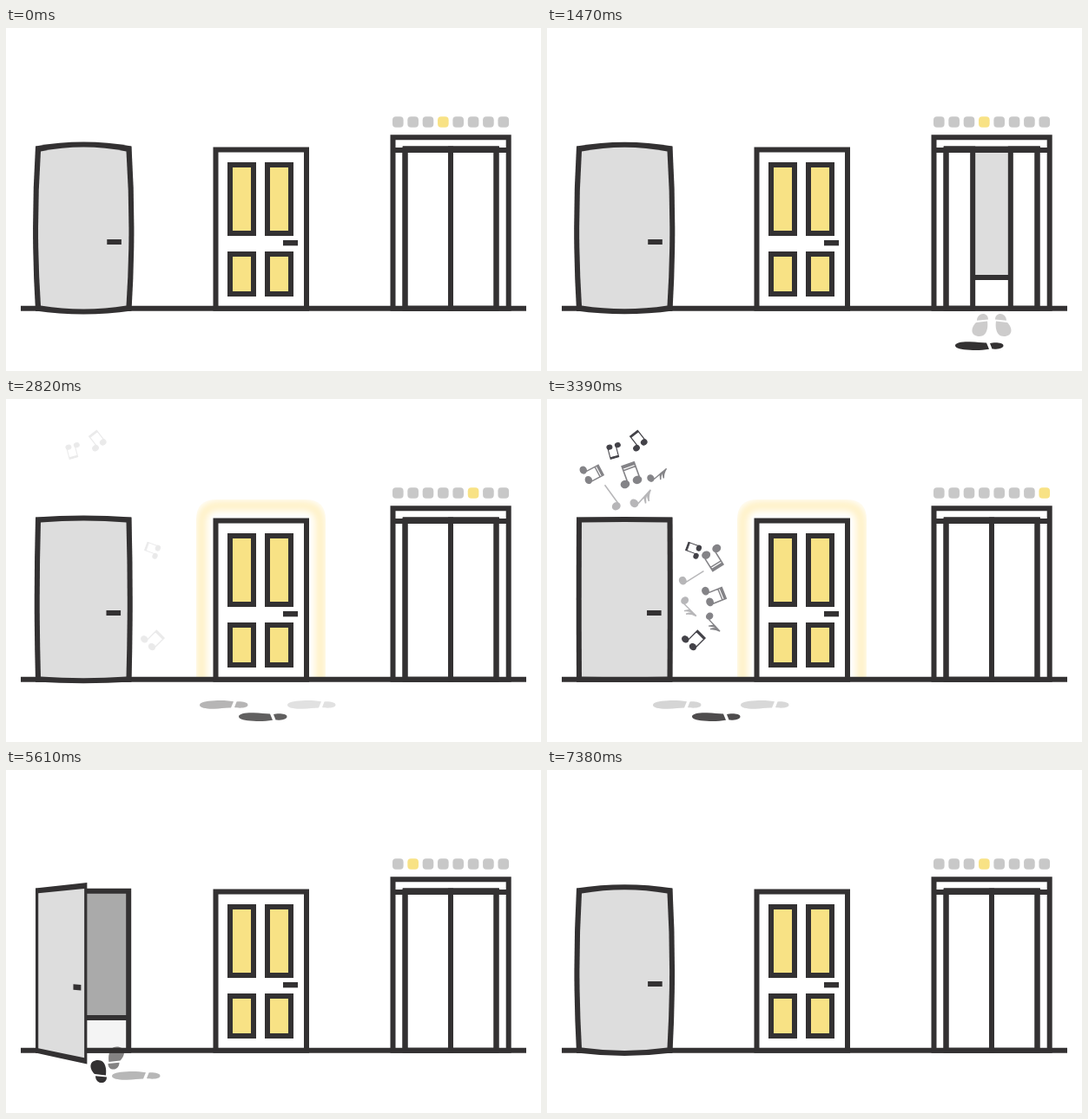
Recreate the animation shown at these times as an HTML page. Size 616x396 px, loop 7410 ms.

```html
<!DOCTYPE html>
<html lang="en">
<head>
<meta charset="utf-8">
<title>Three doors</title>
<style>
html, body { margin: 0; width: 100%; height: 100%; overflow: hidden; background: #fff; }
svg { display: block; width: 616px; height: 396px; }
.line { fill: none; stroke: #333132; stroke-width: 6; }
.ink { fill: #333132; }
.grey { fill: #ddd; }
.white { fill: #fff; }
.panel { fill: #f8e285; stroke: #333132; stroke-width: 6; }
.note { fill: #3b3a40; stroke: #3b3a40; stroke-width: 1.4; }
</style>
</head>
<body>
<svg id="stage" viewBox="0 0 616 396">
  <defs>
    <filter id="soft" x="-20%" y="-20%" width="140%" height="140%"><feGaussianBlur stdDeviation="4"/></filter>
    <clipPath id="halo"><path d="M219 321V139Q219 116 242 116H345Q368 116 368 139V321Z"/></clipPath>
  </defs>
  <g id="glow" clip-path="url(#halo)">
    <path d="M225 335V143Q225 123 245 123H342Q362 123 362 143V335" fill="none" stroke="#fff0c2" stroke-width="11" filter="url(#soft)"/>
  </g>
  <path class="line" d="M17 323.7H599"/>

  <g id="room">
    <rect x="37" y="139.5" width="104" height="146" fill="#aaa"/>
    <rect x="37" y="286" width="104" height="37" fill="#f4f4f4"/>
    <path class="line" d="M37 286H141M37 139.8H141.2V323.7H37Z"/>
  </g>
  <path id="doorEdge" class="ink"/>
  <path id="doorFace" class="grey"/>
  <path id="doorHandle" class="ink"/>

  <rect class="line" x="241.5" y="140.5" width="104.5" height="183.2" style="fill:#fff"/>
  <g class="panel">
    <rect x="258" y="158" width="27" height="79"/>
    <rect x="301" y="158" width="27" height="79"/>
    <rect x="258" y="261" width="27" height="46"/>
    <rect x="301" y="261" width="27" height="46"/>
  </g>
  <rect class="ink" x="319" y="245" width="17" height="6.3"/>

  <rect class="white" x="445" y="126" width="134" height="195"/>
  <rect class="grey" x="460" y="140" width="104" height="146"/>
  <path class="line" d="M460 288H564"/>
  <g class="line" style="fill:#fff">
    <rect id="leafL" x="459.5" y="139.5" height="184.2"/>
    <rect id="leafR" y="139.5" height="184.2"/>
  </g>
  <path class="line" d="M445.5 323.7V126.3H578.7V323.7ZM442.5 141H581.5M459.5 139.5V323.7M564.5 139.5V323.7M457 139.5H568"/>
  <g id="lamps"></g>
  <g id="feet"></g>
  <g id="notes"></g>
</svg>
<script>
const LOOP = 7410, BEAT = 741, RISE = 171;
const $ = id => document.getElementById(id);
const add = (parent, tag, attrs) => {
  const el = document.createElementNS('http://www.w3.org/2000/svg', tag);
  for (const key in attrs) el.setAttribute(key, attrs[key]);
  return parent.appendChild(el);
};
const set = (el, attrs) => { for (const key in attrs) el.setAttribute(key, attrs[key]); };
const ramp = (t, a, b) => Math.min(1, Math.max(0, (t - a) / (b - a)));
const ease = (t, a, b) => (1 - Math.cos(Math.PI * ramp(t, a, b))) / 2;

// Floor indicator
const lamps = Array.from({ length: 8 }, (_, i) =>
  add($('lamps'), 'rect', { x: 445 + i * 17.35, y: 102.2, width: 12.6, height: 12.6, rx: 4 }));

function litLamp(t) {
  const n = 3 + Math.min(14, Math.max(0, Math.floor((t - 2200) / 360) + 1));
  return n <= 7 ? n : Math.abs(14 - n);
}

// Footprints
const SIDE = 'M0 4.5C0 1.5 8 0 17 .3C25 .5 31 1.5 36 1.5L39 8.7C32 10 24 10.2 17 9.8C7 9.3 0 8 0 4.5Z' +
  'M40 2C45 .8 55.5 1 55.5 4.7C55.5 8.2 48 9 42.5 8.6Z';
const FRONT = 'M5 10L18 8.5C19 15 18 26 9 26C-1 26 -2 17 5 10Z' +
  'M6 7.8C6 -2 19 -3 19 6.5Z';
const feet = [];
function foot(shape, transform, start, leave, fade = 600) {
  feet.push({ el: add($('feet'), 'path', { d: shape, class: 'ink', transform }), start, leave, fade });
}
foot(FRONT, 'translate(489 330)', 450, 1170);
foot(FRONT, 'translate(535 330) scale(-1 1)', 450, 1170);
for (let i = 0; i < 9; i++) {
  const upper = i % 2, start = 1250 + 300 * i;
  const x = i === 8 ? 122 : 470 - 101 * Math.floor(i / 2) - 45 * upper;
  const leave = i === 7 ? 5366 : i === 8 ? 4900 : start + 300;
  foot(SIDE, upper ? `translate(${x} 358) scale(1 -1)` : `translate(${x} 362)`, start, leave);
}
foot(FRONT, 'translate(97 361) scale(1 -1)', 5200, 5620, 380);
foot(FRONT, 'translate(136.5 345.5) scale(-1 -1)', 5490, 6090, 300);

// Music notes: x, y, rotation, kind, wave, scale
const head = (x, y) => `M${x - 4} ${y}a4 3.4 0 1 0 8 0a4 3.4 0 1 0 -8 0Z`;
const pair = head(-7, 9) + head(6, 9) + 'M-4 9V-9H9V9V-7H-4Z';
const single = head(0, 12) + 'M3.3 12V-13Z';
const GLYPHS = {
  pair,
  beams: pair + 'M-4 -4.5H9Z',
  single,
  flags: head(0, 9) + 'M3.3 9V-13Q5 -7 10 -3Q6 -5 3.3 -8ZM3.3 -7Q5 -2 9 1Q6 -1 3.3 -3Z'
};
const notes = [
  [103, 47, -38, 'pair', 2, .85],
  [78, 61, 165, 'pair', 2, .75],
  [53, 84, 62, 'beams', 1, 1],
  [94, 86, -20, 'beams', 1, 1.15],
  [126, 86, 50, 'flags', 1, .95],
  [72, 113, -36, 'single', 0, 1.1],
  [107, 113, 42, 'flags', 0, 1.1],
  [167, 174, -70, 'pair', 2, .75],
  [194, 185, 148, 'beams', 1, 1.1],
  [167, 203, 58, 'single', 0, 1.05],
  [194, 225, 68, 'beams', 1, 1.05],
  [165, 239, 135, 'flags', 0, 1],
  [193, 257, 137, 'flags', 1, .95],
  [170, 276, 45, 'pair', 2, .95]
].map(([x, y, turn, kind, wave, size]) => ({
  wave,
  el: add($('notes'), 'path', {
    d: GLYPHS[kind], class: 'note', transform: `translate(${x} ${y}) rotate(${turn}) scale(${size})`
  })
}));

function noteOpacity(t, wave) {
  if (t >= 6 * BEAT) return 0;
  const p = t % BEAT, start = 110 + wave * 80, end = [300, 352, 418][wave];
  return ramp(p, start, start + 70) * (1 - ramp(p, end, end + 200));
}

// Left door
function bulge(t) {
  const beat = Math.floor(t / BEAT), p = t - beat * BEAT;
  if (beat < 6 && p < RISE) return (1 - p / RISE) ** 2.5;
  if ((beat < 5 || beat === 9) && p >= RISE) return ((p - RISE) / (BEAT - RISE)) ** 3;
  return 0;
}

function drawDoor(t) {
  const b = bulge(t);
  const angle = (ease(t, 4600, 5200) - ease(t, 6090, 6750)) * 57.5 * Math.PI / 180;
  const width = Math.cos(angle), lean = Math.sin(angle) / Math.sin(1.0036);
  const at = (x, y) => {
    const u = (x - 34) / 110;
    const px = 34 + (x - 34) * width;
    const py = y + u * lean * (-6.5 + 19.5 * (y - 136.5) / 189.5);
    return `${px.toFixed(2)} ${py.toFixed(2)}`;
  };
  const sheet = inset => {
    const l = 34 + inset, r = 144.5 - inset, top = 136.5 + inset, low = 326.5 - inset;
    const cx = 89.2, cy = 231;
    return `M${at(l, top)}Q${at(cx, top - 10 * b)} ${at(r, top)}Q${at(r + 6 * b, cy)} ${at(r, low)}` +
      `Q${at(cx, low + 8 * b)} ${at(l, low)}Q${at(l - 6 * b, cy)} ${at(l, top)}Z`;
  };
  $('doorEdge').setAttribute('d', sheet(0));
  $('doorFace').setAttribute('d', sheet(6));

  const turn = -15 * (ease(t, 4530, 4680) - ease(t, 4850, 5050)) * Math.PI / 180;
  const cos = Math.cos(turn), sin = Math.sin(turn), hx = 123.2 + 1.4 * b;
  const corners = [[-8.3, -3], [8.3, -3], [8.3, 3], [-8.3, 3]].map(([x, y]) =>
    at(hx + x * cos - y * sin, 247 + x * sin + y * cos));
  $('doorHandle').setAttribute('d', `M${corners.join('L')}Z`);
}

function draw(t) {
  drawDoor(t);

  const gap = 52 * (ease(t, 0, 750) - ease(t, 1030, 1830));
  set($('leafL'), { width: 52.5 - gap });
  set($('leafR'), { x: 512 + gap, width: 52.5 - gap });

  const lit = litLamp(t);
  lamps.forEach((el, i) => el.setAttribute('fill', i === lit ? '#f8e285' : '#c8c8c8'));
  feet.forEach(f => f.el.setAttribute('opacity',
    ramp(t, f.start, f.start + 200) * (1 - ramp(t, f.leave, f.leave + f.fade)) ** 2));
  notes.forEach(n => n.el.setAttribute('opacity', noteOpacity(t, n.wave)));
  $('glow').setAttribute('opacity', ramp(t, 1800, 2100) - ramp(t, 3500, 3850));
}

const begin = performance.now();
function tick() {
  draw((performance.now() - begin) % LOOP);
  requestAnimationFrame(tick);
}
tick();
</script>
</body>
</html>
```
